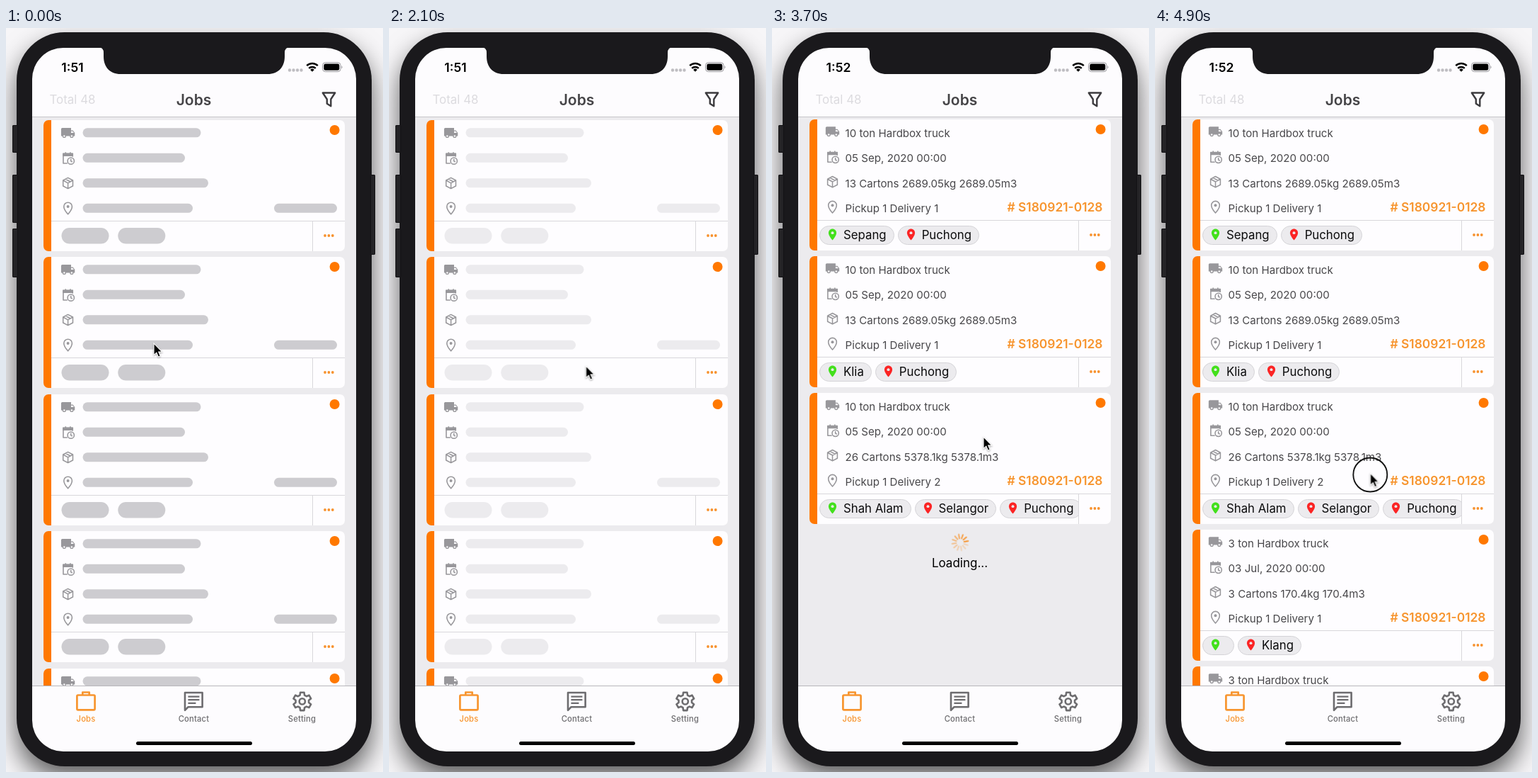
Write an HTML page that moves like this. It is 533 by 1050 pixels and loops after 5000 ms.

```html
<!DOCTYPE html>
<html lang="en">
<head>
<meta charset="utf-8">
<title>Jobs list loading</title>
<style>
@property --grow { syntax: "<number>"; inherits: true; initial-value: 0; }
html, body { margin: 0; width: 100%; height: 100%; overflow: hidden; background: #f7f6f8; }
body { position: relative; font-family: Inter, "Liberation Sans", sans-serif; }
svg, .abs { position: absolute; left: 0; top: 0; }
svg { display: block; }
.phone { left: 15px; top: 6px; width: 502px; height: 1036px; border-radius: 68px;
  background: #1a191c; box-shadow: 0 18px 36px rgba(0, 0, 0, .62); }
.key { background: #242326; border-radius: 2px; box-shadow: inset 0 0 0 1px #121114; }
.screen { left: 37px; top: 28px; width: 458px; height: 993px; border-radius: 44px;
  background: #fdfcfe; }
.list { left: 37px; top: 126px; width: 458px; height: 803px; background: #ecebee; overflow: hidden; }
.card { position: absolute; left: 16px; width: 426px; height: 185px; border-radius: 7px;
  background: #fefdff; overflow: hidden; }
.body { position: absolute; left: 0; bottom: 0; width: 426px; height: 185px; }
.chips { position: absolute; left: 14px; top: 150px; width: 366px; display: flex; gap: 5px; overflow: hidden; }
.chip { position: relative; flex: none; box-sizing: border-box; height: 27px; padding: 0 10px 0 33px;
  border: 1px solid #d4d3d7; border-radius: 14px; background: #ecebee;
  font-size: 16.8px; line-height: 24px; white-space: nowrap; color: #0b0b0c; }
.chip svg { left: 8px; top: 2px; }
.icon { fill: none; stroke: #98979b; stroke-width: 1.9; stroke-linejoin: round; }
.icon .solid { fill: #98979b; stroke: none; }
.row { font-size: 15.1px; fill: #48474a; }
.order { font-size: 17.4px; font-weight: 600; fill: #f7952f; text-anchor: end; }
.tab { font-size: 11.2px; font-weight: 500; letter-spacing: .2px; text-anchor: middle; }

.bar, .before-list, .after-list, .before-tick, .after-tick, .list, .more, .pointer, .ring {
  animation: 5s step-end -10ms infinite; }
.bar { animation-name: pulse; }
.before-list { animation-name: before-list; }
.after-list { animation-name: after-list; }
.before-tick { animation-name: before-tick; }
.after-tick { animation-name: after-tick; }
.list { animation-name: grow; }
.pointer { animation-name: point; }
.ring { animation-name: press; }
.more { animation-name: appear;
  top: calc(577px + 5px * var(--grow) + var(--i) * 193px * var(--grow));
  height: calc(189px * var(--grow) - 4px * min(1, var(--grow) * 9)); }
.loading { left: 0; top: calc(573px + 579px * var(--grow)); width: 458px; height: 80px; }
.spin { transform-origin: 229px 27px; animation: spin 1s steps(12) -10ms infinite; }

@keyframes pulse {
  0% { fill: #cdccd0; } 16% { fill: #cbcace; } 18% { fill: #c8c7cb; }
  24% { fill: #c7c6ca; } 40% { fill: #dad9dc; } 42%, 100% { fill: #ecebee; }
}
@keyframes before-list { 0% { visibility: visible; } 44%, 100% { visibility: hidden; } }
@keyframes after-list { 0% { visibility: hidden; } 44%, 100% { visibility: visible; } }
@keyframes before-tick { 0% { visibility: visible; } 48%, 100% { visibility: hidden; } }
@keyframes after-tick { 0% { visibility: hidden; } 48%, 100% { visibility: visible; } }
@keyframes appear { 0% { opacity: 0; } 86%, 100% { opacity: 1; } }
@keyframes press { 0% { opacity: 0; } 98%, 100% { opacity: 1; } }
@keyframes grow {
  0% { --grow: 0; } 86% { --grow: .107; } 88% { --grow: .5; }
  90% { --grow: .89; } 92%, 100% { --grow: 1; }
}
@keyframes point {
  0% { transform: translate(209px, 445px); }
  26% { transform: translate(209px, 445px); animation-timing-function: steps(6); }
  38% { transform: translate(263px, 470px); animation-timing-function: steps(2); }
  42% { transform: translate(278.5px, 477px); }
  50% { transform: translate(278.5px, 477px); animation-timing-function: steps(6); }
  62% { transform: translate(299px, 577px); }
  88% { transform: translate(299px, 577px); animation-timing-function: steps(4); }
  96%, 100% { transform: translate(304.5px, 628.5px); }
}
@keyframes spin { to { transform: rotate(360deg); } }
</style>
</head>
<body>
<div class="abs phone"></div>
<div class="abs key" style="left:9px;top:137px;width:8px;height:39px"></div>
<div class="abs key" style="left:9px;top:207px;width:8px;height:68px"></div>
<div class="abs key" style="left:9px;top:283px;width:8px;height:69px"></div>
<div class="abs key" style="left:515px;top:207px;width:7px;height:113px"></div>
<div class="abs screen"></div>

<div class="abs list">
  <div class="before-list" id="skeleton"></div>
  <div class="after-list" id="jobs"></div>
</div>

<svg width="533" height="1050" viewBox="0 0 533 1050">
  <path d="M130 27q8 0 8 8v5c0 15 9 25 24 25H370c15 0 24-10 24-25v-5q0-8 8-8z" fill="#1a191c"/>
  <g font-size="17.6" font-weight="600" text-anchor="middle">
    <text class="before-tick" x="94" y="61.5">1:51</text>
    <text class="after-tick" x="94" y="61.5">1:52</text>
  </g>
  <path d="M401 59.5h17" stroke="#bebdc1" stroke-width="4.4" stroke-linecap="round" stroke-dasharray="0 5.5"/>
  <g fill="none" stroke="#000" stroke-width="2.5">
    <path d="M425.2 53.2a11.2 11.2 0 0 1 15.6 0M428.2 56.8a7 7 0 0 1 9.6 0"/>
    <path d="M433 61.8l-2.8-2.9a4 4 0 0 1 5.6 0z" fill="#000" stroke="none"/>
  </g>
  <rect x="447.5" y="48.8" width="25.6" height="12.8" rx="4" fill="none" stroke="#96959a"/>
  <rect x="449.3" y="50.6" width="22" height="9.2" rx="2.4"/>
  <path d="M474.5 53.2q2.2 2 0 4.2z" fill="#96959a"/>

  <text x="61.5" y="107" font-size="16.9" fill="#dcdbdf">Total 48</text>
  <text x="265.5" y="108.5" font-size="21" font-weight="600" text-anchor="middle" fill="#454447">Jobs</text>
  <path d="M447.8 91.5H465.2L459.3 100.5V110.3L453.8 106.8V100.5Z" fill="none" stroke="#3c3b3e" stroke-width="2.4" stroke-linejoin="round"/>
  <path d="M37 125.5H495" stroke="#c6c5c9"/>

  <path d="M37 928.5H495" stroke="#b7b6ba"/>
  <g fill="none" stroke="#f7952f" stroke-width="2.7" stroke-linejoin="round">
    <rect x="100.4" y="941.5" width="25.2" height="20.8" rx="1.5"/>
    <path d="M108.3 941v-3.5h9.4v3.5"/>
  </g>
  <g fill="none" stroke="#6d6c6f" stroke-width="2.6" stroke-linejoin="round">
    <path d="M253 938H277.6V958.2H257.6L253 962.8Z"/>
    <path d="M257.4 943.6h16M257.4 948.2h16M257.4 952.8h11" stroke-width="2.3"/>
    <path id="gear"/>
    <circle cx="418.8" cy="950.4" r="4.1"/>
  </g>
  <text class="tab" x="113" y="979" fill="#f7952f">Jobs</text>
  <text class="tab" x="265.5" y="979" fill="#6d6c6f">Contact</text>
  <text class="tab" x="418.5" y="979" fill="#6d6c6f">Setting</text>
  <rect x="184" y="1007" width="164" height="5" rx="2.5"/>

  <circle class="ring" cx="304.3" cy="630.5" r="24" fill="none" stroke="#141414" stroke-width="1.9"/>
  <g class="pointer">
    <path d="M0 0V16.6L3.8 13.1 6.4 19.2 9.2 18 6.7 12.1H11.8Z" stroke="#fff" stroke-width="1.1"
      style="filter:drop-shadow(0 1px 1px rgba(0,0,0,.35))"/>
  </g>
</svg>

<script>
const pinShape = "M12 2C8.1 2 5 5.1 5 9c0 5.3 7 13 7 13s7-7.7 7-13c0-3.9-3.1-7-7-7z";
const glyphs = [
  `<path class="solid" fill-rule="evenodd" d="M20 8h-3V4H3c-1.1 0-2 .9-2 2v11h2a3 3 0 0 0 6 0h6a3 3 0 0 0 6 0h2v-5zM19.5 9.5l2 2.5H17V9.5z"/>
   <g fill="#fefdff" stroke="none"><circle cx="6" cy="17" r="1.4"/><circle cx="18" cy="17" r="1.4"/></g>`,
  `<path d="M11 21H4V4.5H20V10M8 2v3M16 2v3"/><path class="solid" d="M3 4H21V9H3z"/>
   <circle cx="17" cy="17" r="5.6"/><path d="M17 13.6V17.2l2.5 1.5"/>`,
  `<path d="M12 2.8L20.3 7.2V16.8L12 21.2 3.7 16.8V7.2ZM3.7 7.2L12 11.8 20.3 7.2M12 11.8V21M7.8 5L16.2 9.6"/>`,
  `<path d="${pinShape}"/><circle class="solid" cx="12" cy="9" r="2.4"/>`
];
const iconRows = [18, 53.5, 89, 124.5];

function icons(cx, dy) {
  return glyphs.map((glyph, i) => {
    const scale = i ? 0.83 : 0.88;
    return `<g class="icon" transform="translate(${cx} ${iconRows[i] + dy}) scale(${scale}) translate(-12 -12)">${glyph}</g>`;
  }).join("");
}

function cardShapes(iconX, iconDy, content) {
  const dots = [398, 403.4, 408.8].map(x => `<circle cx="${x}" cy="163" r="1.9" fill="#f7922e"/>`).join("");
  return `<svg width="426" height="185"><rect width="11" height="185" fill="#ff7800"/>
    <path d="M11 142.5H426M380.5 142.5V185" stroke="#d8d7db" fill="none"/>
    <circle cx="411.6" cy="14" r="7" fill="#ff7800"/>${dots}${icons(iconX, iconDy)}${content}</svg>`;
}

function bar(x, cy, width, height) {
  return `<rect class="bar" x="${x}" y="${cy - height / 2}" width="${width}" height="${height}" rx="${height / 2}"/>`;
}

function skeletonCard(i) {
  const bars = [167, 144.5, 177.5, 155.5].map((w, row) => bar(55.5, iconRows[row] - .2, w, 13)).join("")
    + bar(326, 124.3, 89, 13) + bar(25.5, 163.3, 67, 22.5) + bar(105.3, 163.3, 67, 22.5);
  return `<div class="card" style="top:${3.5 + i * 193.5}px">${cardShapes(34.6, 0, bars)}</div>`;
}

function chip(name, i) {
  return `<div class="chip"><svg width="19" height="19" viewBox="0 0 24 24"><path fill="${i ? "#fb2424" : "#43e01c"}"
    d="${pinShape}"/><circle cx="12" cy="9" r="2.5" fill="#ecebee"/></svg>${name}</div>`;
}

function jobCard(job, attributes) {
  const rows = job.rows.map((text, i) => `<text class="row" x="50.6" y="${24.5 + i * 35.5}">${text}</text>`).join("");
  const order = `<text class="order" x="414.5" y="130">#&nbsp;S180921-0128</text>`;
  return `<div ${attributes}><div class="body">${cardShapes(32.5, -.8, rows + order)}
    <div class="chips">${job.stops.map(chip).join("")}</div></div></div>`;
}

function job(tons, date, cargo, stops) {
  const rows = [`${tons} ton Hardbox truck`, `${date}, 2020 00:00`, cargo, `Pickup 1 Delivery ${stops.length - 1}`];
  return { rows, stops };
}

const single = "13 Cartons 2689.05kg 2689.05m3";
const firstJobs = [
  job(10, "05 Sep", single, ["Sepang", "Puchong"]),
  job(10, "05 Sep", single, ["Klia", "Puchong"]),
  job(10, "05 Sep", "26 Cartons 5378.1kg 5378.1m3", ["Shah Alam", "Selangor", "Puchong"])
];
const nextJob = job(3, "03 Jul", "3 Cartons 170.4kg 170.4m3", ["", "Klang"]);

const spokes = Array.from({ length: 12 }, (_, i) =>
  `<path d="M229 21.2V15.6" opacity="${Math.max(.28, 1 - i * .085)}" transform="rotate(${-i * 30 + 200} 229 27)"/>`).join("");
const loading = `<div class="abs loading"><svg width="458" height="80">
  <g class="spin" stroke="#f7952f" stroke-width="2" stroke-linecap="round">${spokes}</g>
  <text x="228.5" y="61.5" font-size="17" text-anchor="middle">Loading...</text></svg></div>`;

document.getElementById("skeleton").innerHTML = [0, 1, 2, 3, 4].map(skeletonCard).join("");
document.getElementById("jobs").innerHTML = loading
  + firstJobs.map((entry, i) => jobCard(entry, `class="card" style="top:${3 + i * 193}px"`)).join("")
  + [0, 1].map(i => jobCard(nextJob, `class="card more" style="--i:${i}"`)).join("");

const gearPoints = [];
for (let tooth = 0; tooth < 6; tooth++) {
  for (const [offset, radius] of [[-20, 9.4], [-12, 13], [12, 13], [20, 9.4]]) {
    const angle = (tooth * 60 + offset) * Math.PI / 180;
    gearPoints.push(`${418.8 + radius * Math.sin(angle)} ${950.4 - radius * Math.cos(angle)}`);
  }
}
document.getElementById("gear").setAttribute("d", `M${gearPoints.join("L")}Z`);
</script>
</body>
</html>
```
